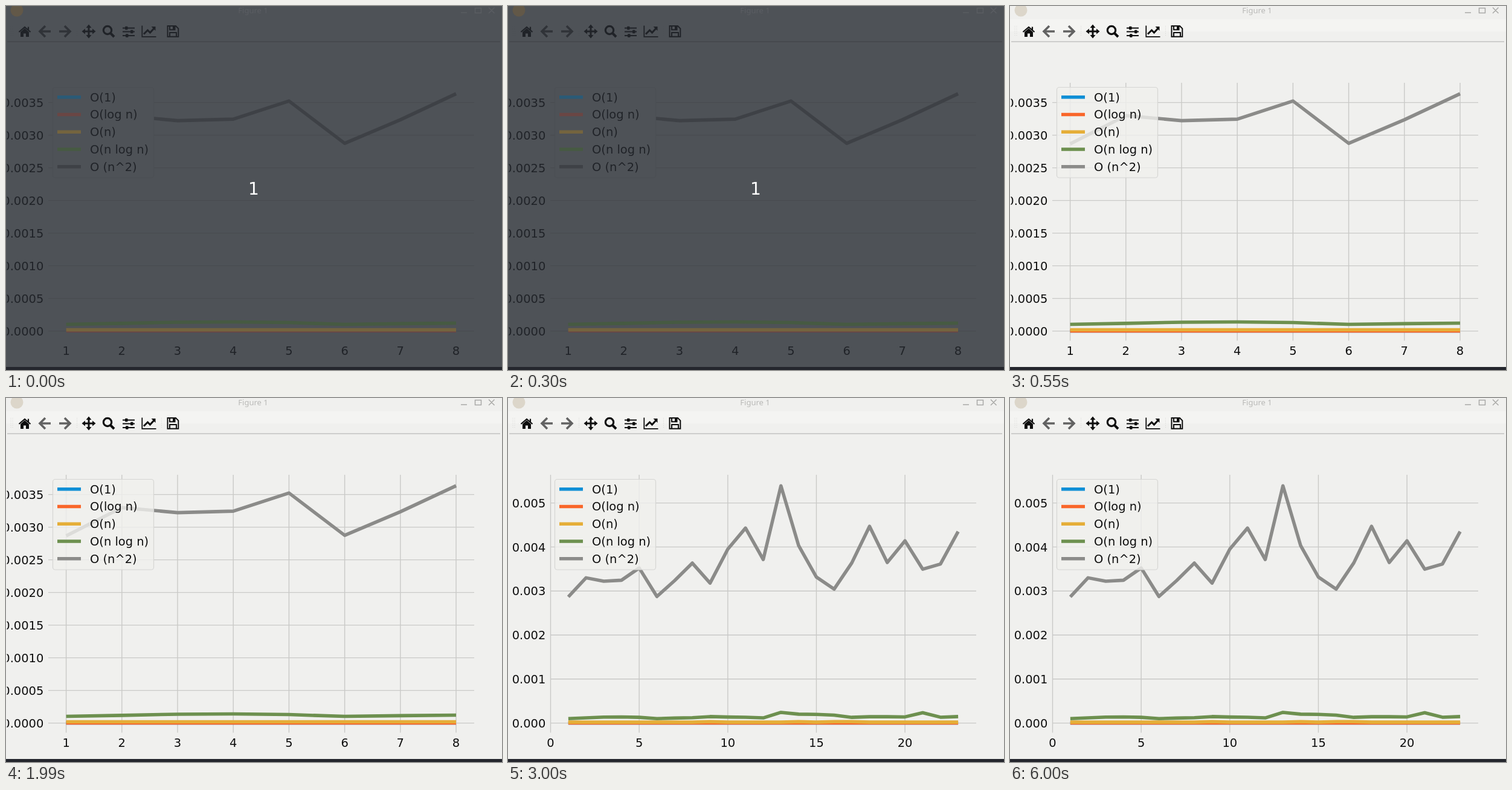
Write an HTML page that moves like this. It is 821x602 px and loops after 8 s.

```html
<!DOCTYPE html>
<html lang="en">
<head>
<meta charset="utf-8">
<title>Complexity plot</title>
<style>
html, body { margin: 0; width: 100%; height: 100%; overflow: hidden; background: #f0f0ee; }
svg { display: block; }
text { font-family: "DejaVu Sans", sans-serif; font-size: 19.44px; }
.title { font-family: "Noto Sans", sans-serif; font-size: 13px; }
.count { font-size: 28px; }
</style>
</head>
<body>
<svg id="stage" width="821" height="602" viewBox="0 0 821 602"></svg>
<script>
const stage = document.getElementById("stage");
const LOOP = 8000;
const BASE = 537.6;

// Run times in milliseconds, one list per curve
const quadratic = [2.866, 3.3, 3.222, 3.245, 3.523, 2.875, 3.236, 3.634, 3.18, 3.95, 4.43, 3.716,
  5.39, 4.03, 3.317, 3.043, 3.64, 4.47, 3.647, 4.14, 3.496, 3.613, 4.35];
const loglinear = [.102, .118, .136, .139, .13, .102, .113, .122, .147, .137, .133, .117,
  .243, .202, .196, .179, .13, .144, .144, .14, .234, .133, .147];
const linear = quadratic.map((_, i) => [8, 13, 15, 16].includes(i) ? .032 : .02);
const constant = quadratic.map(() => .001);
const curves = [constant, constant, linear, loglinear, quadratic];
const names = ["O(1)", "O(log n)", "O(n)", "O(n log n)", "O (n^2)"];

const light = {
  bg: "#f0f0ee", bar: "#f4f4f2", ink: "#0e0e0e", soft: "#626262", title: "#b9b9b7",
  button: "#a9a9a7", grid: "#c9c9c7", rule: "#c2c2c0", edge: "#d6d6d4", badge: "#dcd6ca",
  lines: ["#108fd6", "#f9662a", "#e5ae38", "#6d904f", "#8b8b89"], legendAlpha: .8
};
const muted = { ...light, lines: light.lines.with(1, "#e1663d") };
const dim = {
  bg: "#4e5257", bar: "#4e5257", ink: "#202328", soft: "#303338", title: "#5b5e63",
  button: "#5a5d62", grid: "#484b50", rule: "#43464b", edge: "#4b4f54", badge: "#625848",
  lines: ["#2b5a76", "#6a4644", "#74643f", "#465a42", "#3e4146"], legendAlpha: 1
};

const short = {
  count: 8, unit: 108, step: .5, digits: 4, rows: 8, x: n => 99.6 + (n - 1) * 92.2,
  ticks: [1, 2, 3, 4, 5, 6, 7, 8]
};
const long = {
  count: 23, unit: 72.8, step: 1, digits: 3, rows: 6, x: n => 70.5 + n * 29.33,
  ticks: [0, 5, 10, 15, 20]
};

const scenes = [
  { from: 0, theme: dim, plot: short, countdown: 1 },
  { from: 500, theme: muted, plot: short },
  { from: 550, theme: light, plot: short },
  { from: 2950, theme: light, plot: long }
];

const rect = (x, y, w, h, fill, extra = "") =>
  `<rect x="${x}" y="${y}" width="${w}" height="${h}" fill="${fill}" ${extra}/>`;
const stroke = (d, color, width, extra = "") =>
  `<path d="${d}" fill="none" stroke="${color}" stroke-width="${width}" ${extra}/>`;
const fill = (d, color) => `<path d="${d}" fill="${color}" fill-rule="evenodd"/>`;
const label = (text, x, y, color, anchor = "start", cls = "") =>
  `<text x="${x}" y="${y}" fill="${color}" text-anchor="${anchor}" class="${cls}">${text}</text>`;

function windowBar(c) {
  return rect(0, 22, 821, 20, c.bar)
    + `<circle cx="18" cy="7" r="10.5" fill="${c.badge}"/>`
    + label("Figure 1", 409, 12, c.title, "middle", "title")
    + stroke("M753 11H763M776.5 3.5H786.5V11.5H776.5ZM799 2.5L808.5 12M808.5 2.5L799 12", c.button, 1.5)
    + stroke("M2 59H818", c.rule, 1.6);
}

function toolbar(c) {
  const arrow = "M65 33L56 42L65 51M57 42H74";
  const sliders = [[36.5, 199], [42.5, 208], [49, 200]]
    .map(([y, x]) => stroke(`M193 ${y}H213`, c.ink, 2) + rect(x - 2, y - 2.7, 4.5, 5.4, c.ink, 'rx="1"'));
  return stroke("M8 33V50M11 33V50M117.5 33V50M257.5 33V50", c.edge, 1, 'stroke-dasharray="1 2"')
    + fill("M24 43L31 37L38 43V51H33V45.5H29V51H24Z", c.ink)
    + stroke("M21.5 43L31 35L40.5 43M37 34.5V40", c.ink, 2.2)
    + stroke(arrow, c.soft, 3.6)
    + `<g transform="matrix(-1 0 0 1 162 0)">${stroke(arrow, c.soft, 3.6)}</g>`
    + stroke("M137 34V50M129 42H145", c.ink, 3)
    + fill("M137 30.5L141.5 36H132.5ZM137 53.5L141.5 48H132.5ZM125.5 42L131 37.5V46.5ZM148.5 42L143 37.5V46.5Z", c.ink)
    + `<circle cx="168" cy="40" r="6.7" fill="none" stroke="${c.ink}" stroke-width="3.2"/>`
    + stroke("M173 45L179 51", c.ink, 4)
    + sliders.join("")
    + stroke("M225.3 32.5V50.8H248.5", c.ink, 1.8)
    + stroke("M228 46.5L234.5 40L238.5 44L245 37", c.ink, 3)
    + fill("M240.5 34H247.5V41Z", c.ink)
    + stroke("M267.5 33H281L285.3 37.3V50.8H267.5ZM271 33V39.3H279.5V33M271 50V44H282V50", c.ink, 2)
    + rect(276, 33, 3, 6, c.ink);
}

function chart(c, plot, dimmed) {
  let out = "";
  for (const n of plot.ticks) {
    const x = plot.x(n);
    if (!dimmed) out += stroke(`M${x} 127V553.5`, c.grid, 1.4);
    out += label(n, x, 577, c.ink, "middle");
  }
  for (let i = 0; i < plot.rows; i++) {
    const value = i * plot.step;
    const y = BASE - value * plot.unit;
    out += stroke(`M70 ${y}H775`, c.grid, 1.4)
      + label((value / 1000).toFixed(plot.digits), 62.3, y + 7.2, c.ink, "end");
  }
  curves.forEach((values, k) => {
    const points = values.slice(0, plot.count)
      .map((v, i) => `${plot.x(i + 1).toFixed(2)} ${(BASE - v * plot.unit).toFixed(2)}`);
    out += stroke("M" + points.join("L"), c.lines[k], 5.56, 'stroke-linejoin="round"');
  });
  return out + rect(0, 120, 1.5, 430, c.bg);
}

function legend(c) {
  return rect(77.5, 134.5, 167, 149.5, c.bg,
    `rx="4" fill-opacity="${c.legendAlpha}" stroke="${c.edge}" stroke-width="1.2"`)
    + names.map((name, i) => {
      const y = 150.8 + i * 28.75;
      return stroke(`M85 ${y}H124`, c.lines[i], 5.56) + label(name, 139, y + 6.8, c.ink);
    }).join("");
}

function draw({ theme, plot, countdown }) {
  stage.innerHTML = rect(0, 0, 821, 602, theme.bg)
    + windowBar(theme) + toolbar(theme)
    + chart(theme, plot, Boolean(countdown)) + legend(theme)
    + rect(0, 597, 821, 5, "#24262d")
    + (countdown ? label(countdown, 410, 312, "#fff", "middle", "count") : "");
}

let shown;
function update() {
  const time = performance.now() % LOOP;
  const scene = scenes.findLast(s => time >= s.from);
  if (scene !== shown) draw(shown = scene);
  requestAnimationFrame(update);
}
update();
</script>
</body>
</html>
```
